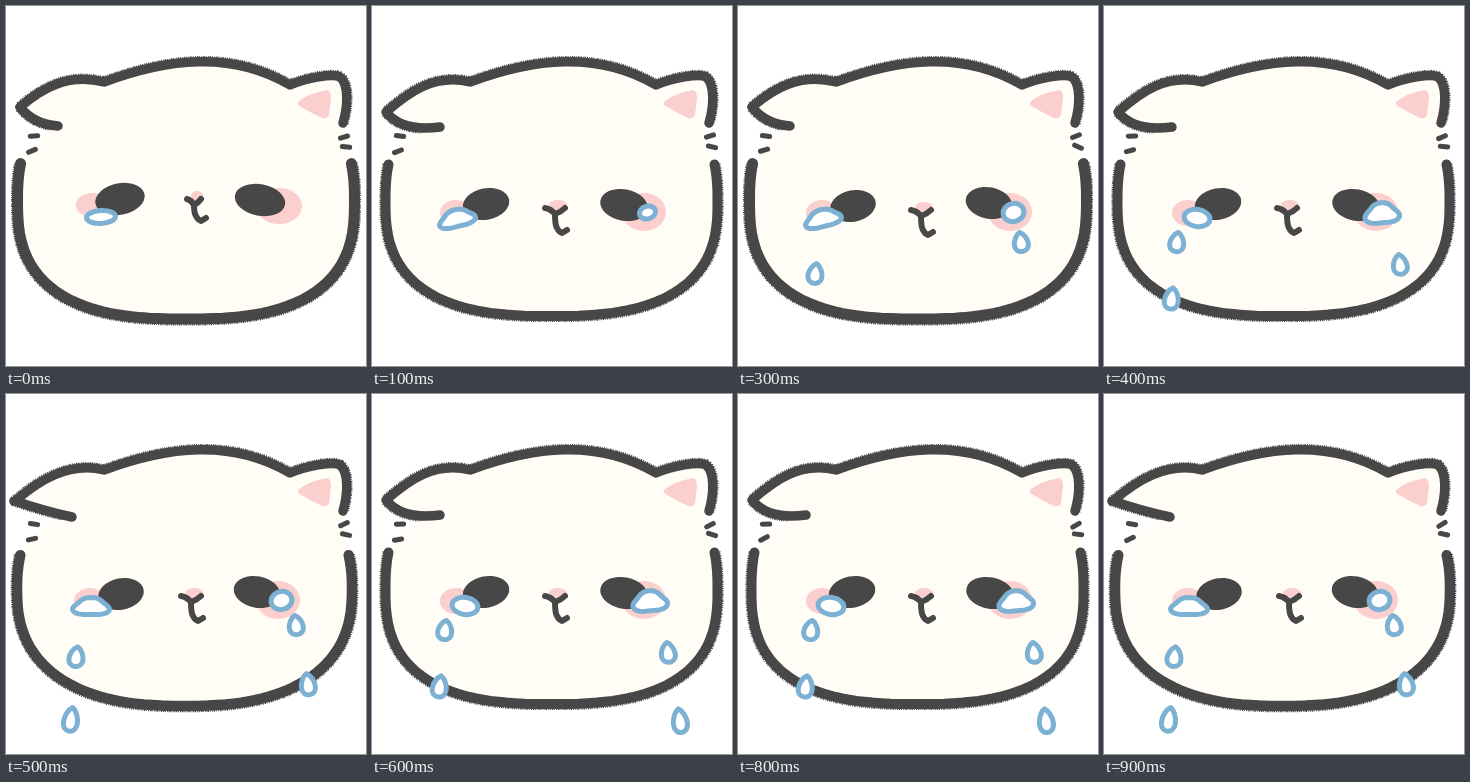
Write an HTML page that moves like this. It is 360 px wide and 360 px high and loops after 1000 ms.

```html
<!DOCTYPE html>
<html lang="en">
<head>
<meta charset="utf-8">
<title>Crying kitten</title>
<style>
html, body { margin: 0; width: 100%; height: 100%; overflow: hidden; background: #fff; }
svg { display: block; width: 100vw; height: 100vh; }
</style>
</head>
<body>
<svg id="stage" viewBox="0 0 360 360" fill="none" stroke-linecap="round" stroke-linejoin="round"></svg>
<script>
const INK = '#474747', CREAM = '#fffdf5', PINK = '#fbcfcd', BLUE = '#7db1d3';
const STEP = 100, COUNT = 10;
const WATER = `fill="#fff" stroke="${BLUE}" stroke-width="5"`;
const stage = document.getElementById('stage');

const line = (d, width, extra = '') =>
  `<path d="${d}" stroke="${INK}" stroke-width="${width}" ${extra}/>`;
const shape = (d, color) => `<path d="${d}" fill="${color}"/>`;
const oval = (x, y, rx, ry, turn, attrs) =>
  `<ellipse cx="${x}" cy="${y}" rx="${rx}" ry="${ry}" transform="rotate(${turn} ${x} ${y})" ${attrs}/>`;
const dot = (color, x, y, rx, ry, turn = 0) => oval(x, y, rx, ry, turn, `fill="${color}"`);
const ring = (x, y, rx, ry, turn = 0) => oval(x, y, rx, ry, turn, WATER);

function random(seed) {
  return () => {
    seed = (seed * 16807) % 2147483647;
    return seed / 2147483647;
  };
}

// Samples point(t) evenly from t0 to t1 and joins the results.
function trace(point, t0, t1, steps) {
  const pts = [];
  for (let i = 0; i <= steps; i++) {
    pts.push(point(t0 + (t1 - t0) * i / steps).map(v => v.toFixed(1)).join());
  }
  return pts.join('L');
}

// Ear: loose end, bend and tip. Jaw: centre, half width, depth, squareness.
const poses = {
  wide: {
    ear: [[52, 120], [27, 118], [14, 101]],
    jaw: [180, 168.5, 118, 2.65], pen: 11,
    eyes: [[115, 200], [251, 197]], eyeWidth: 23, mouth: [183, 210]
  },
  flat: {
    ear: [[68, 121], [30, 126], [14, 106]],
    jaw: [179.5, 166, 115, 2.65], pen: 10,
    eyes: [[114, 198], [252, 199]], eyeWidth: 23.5, mouth: [183, 208]
  },
  sharp: {
    ear: [[66, 123], [38, 117], [9, 107]],
    jaw: [178.5, 167.5, 117, 2.45], pen: 10.5,
    eyes: [[115, 200], [251, 198]], eyeWidth: 23, mouth: [185, 208]
  }
};
const dry = { eyes: [[114, 193], [254, 194]], eyeWidth: 25, mouth: [188, 199] };

function drawHead({ ear: [end, bend, tip], jaw: [cx, rx, ry, n], pen }) {
  const [x, y] = tip;
  const crown = `M${end}Q${bend} ${tip}C${x + 22},${y - 19} 62,67 98,76` +
    'C160,53 225,44 284,79C300,72 327,67 334,71C343,78 342,100 337,117';
  const power = v => Math.sign(v) * Math.abs(v) ** (2 / n);
  const jaw = trace(t => [cx + rx * power(Math.cos(t)), 195 + ry * power(Math.sin(t))],
    -0.22, Math.PI + 0.22, 80);
  const fringe = 'stroke-dasharray="1 1.3 .7 .9 1.4 1" stroke-linecap="butt"';
  return line(crown, 11.5, fringe) + line('M' + jaw, pen + 2.2, fringe) +
    shape(`${crown}Q337,138 ${jaw}Q30,130 ${end}Z`, CREAM) +
    line(crown, 9.5) + line('M' + jaw, pen) +
    shape('M292,96Q303,87 321,84Q325,85 325,92L323,109Q321,113 316,112Q303,106 292,99Z', PINK);
}

function drawWhiskers(n) {
  const rand = random(n * 977 + 31);
  let d = '';
  for (const side of [-1, 1]) {
    for (const row of [0, 1]) {
      const x = side < 0 ? 28 - 2 * row : 338 + 2 * row;
      const y = 130 + row * (side < 0 ? 14 : 10) + rand() * 2;
      const angle = (row ? 0.3 : -0.4) * side - (side < 0 ? 0.3 * (1 - row) : 0) + (rand() - 0.5) * 0.4;
      const dx = 3.7 * Math.cos(angle), dy = 3.7 * Math.sin(angle);
      d += `M${x - dx},${y - dy}L${x + dx},${y + dy}`;
    }
  }
  return line(d, 5);
}

function drawFace({ eyes: [left, right], eyeWidth, mouth: [x, y] }, crying) {
  const blush = crying
    ? dot(PINK, 84, 207, 16, 13) + dot(PINK, 272, 206, 22, 19)
    : dot(PINK, 86, 199, 16, 12) + dot(PINK, 273, 200, 23, 18);
  const arm = crying ? 10 : 7, stem = crying ? 14 : 11;
  const lips = `M${x - arm},${y - 6}q${arm * 0.6},1 ${arm},6q${arm * 0.6},-2 ${arm},-6` +
    `M${x},${y}q0,${stem - 3} 2,${stem}q2,4 5,5l5,-3`;
  return blush +
    dot(INK, ...left, eyeWidth, 15.7, -11) + dot(INK, ...right, eyeWidth + 0.5, 15.7, 11) +
    dot(PINK, x + 3, y - 9, arm - 1, 5) + line(lips, 6);
}

// A pool of tears is an oval with a rippled rim.
function pool(x, y, rx, ry, turn) {
  const rim = trace(t => {
    const r = 1 + 0.13 * Math.sin(3 * t);
    return [rx * r * Math.cos(t), ry * r * Math.sin(t)];
  }, 0, 2 * Math.PI, 36);
  return `<path d="M${rim}Z" transform="translate(${x} ${y}) rotate(${turn})" ${WATER}/>`;
}

// The two eyes take turns: one wells up while the other lets a drop go.
function drawPools(n) {
  if (n === 0) return ring(95, 211, 14.5, 6.5, -3);
  if (n % 2 === 0) return ring(93, 212, 13, 8.5, 8) + pool(278, 208, 16.5, 10, -5);
  const swell = Math.min(1, n / 3);
  return pool(85, 213, 17.5, 8.5, n < 4 ? -14 : 0) +
    ring(275.5, 206.5, 7 + 3.5 * swell, 5 + 4 * swell, -15);
}

function drop(x, y, h, lean) {
  const d = `M0,${-h}C4,${-h * 0.8} 7,${-h * 0.2} 7,${h * 0.25}` +
    `C7,${h * 1.25} -7,${h * 1.25} -7,${h * 0.25}C-7,${-h * 0.2} -4,${-h * 0.8} 0,${-h}Z`;
  return `<path d="${d}" transform="translate(${x} ${y}) rotate(${lean})" ${WATER}/>`;
}

// A drop is born every second step, speeds up as it falls and lives four steps.
const streams = [
  { born: 2, x: 73, y: 236, drift: -2.7, pull: 1.6, lean: 8 },
  { born: 3, x: 290, y: 231, drift: 6, pull: 2.3, lean: -8 }
];

function drawDrops(n) {
  const slip = n === 3 ? 7 : 0; // the first drops hang closer to the nose
  let out = '';
  for (const { born, x, y, drift, pull, lean } of streams) {
    for (let b = born; b <= n; b += 2) {
      const age = n - b;
      if (age > 3) continue;
      out += drop(x + drift * age + slip * Math.sign(lean),
        y + 25 * age + pull * age * age + slip * 0.7, 9.7 + 0.25 * age * age, lean);
    }
  }
  return out;
}

// The sketch cycles through its three redraws, then flickers between two.
function poseAt(n) {
  if (n < 6) return ['wide', 'flat', 'sharp'][n % 3];
  return n % 2 ? 'sharp' : 'flat';
}

function draw(n) {
  const pose = poses[poseAt(n)];
  stage.innerHTML = drawHead(pose) + drawWhiskers(n) +
    drawFace(n ? pose : dry, n > 0) + drawPools(n) + drawDrops(n);
}

let shown = -1;
const begin = performance.now();
function tick() {
  const n = Math.floor((performance.now() - begin) / STEP) % COUNT;
  if (n !== shown) draw(shown = n);
  requestAnimationFrame(tick);
}
tick();
</script>
</body>
</html>
```
